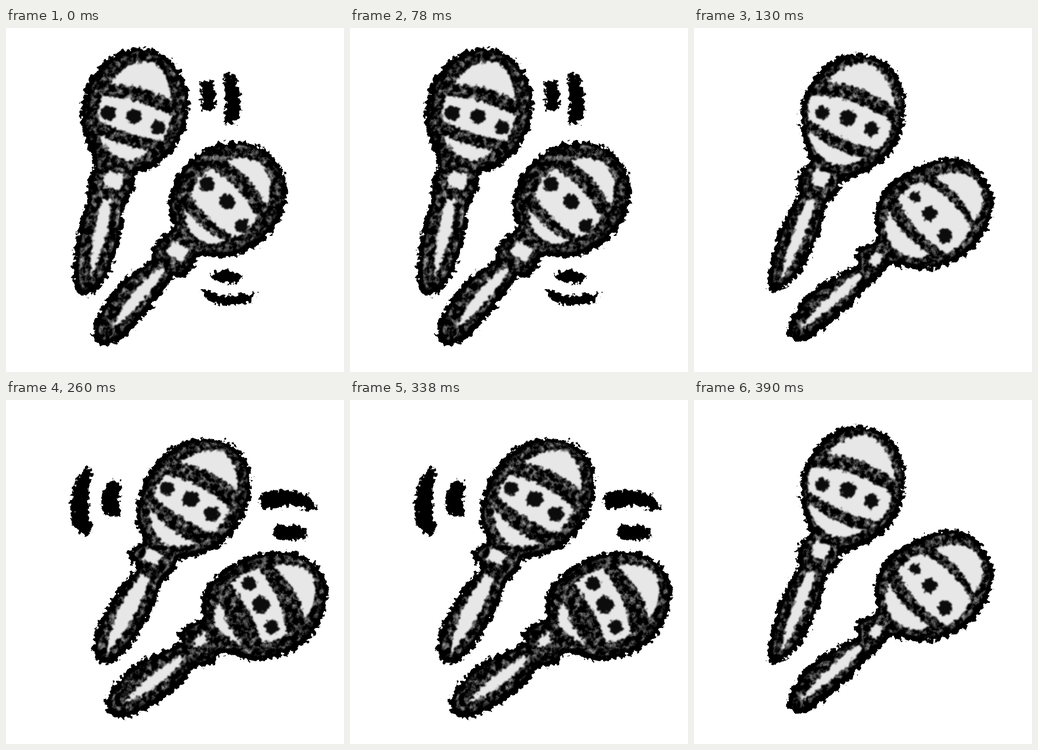
Write an HTML page that moves like this. It is 741 by 756 pixels and loops after 0.52 s.

```html
<!DOCTYPE html>
<html lang="en">
<head>
<meta charset="utf-8">
<title>Shaking maracas</title>
<style>
  html, body { margin: 0; width: 100%; height: 100%; overflow: hidden; background: #fff; }
  svg { position: absolute; left: 0; top: 0; width: 100%; height: 100%; }
  .pose { opacity: 0; will-change: opacity; }
</style>
</head>
<body>
<svg viewBox="0 0 741 756" aria-hidden="true">
  <defs>
    <!-- Ragged ink outline around a mottled charcoal body -->
    <filter id="charcoal" filterUnits="userSpaceOnUse" x="0" y="0" width="741" height="756" color-interpolation-filters="sRGB">
      <feTurbulence type="fractalNoise" baseFrequency=".1" numOctaves="3" seed="4" result="wobble"/>
      <feDisplacementMap in="SourceGraphic" in2="wobble" scale="22" xChannelSelector="R" yChannelSelector="G" result="ink"/>
      <feTurbulence type="fractalNoise" baseFrequency=".075" numOctaves="4" seed="9"/>
      <feColorMatrix values="1.5 0 0 0 -.66  1.5 0 0 0 -.66  1.5 0 0 0 -.66  0 0 0 0 1" result="grain"/>
      <feMorphology in="SourceAlpha" operator="erode" radius="9"/>
      <feOffset dx="1" dy="-2"/>
      <feGaussianBlur stdDeviation="1.5" result="core"/>
      <feComposite in="grain" in2="core" operator="in" result="body"/>
      <feMerge><feMergeNode in="ink"/><feMergeNode in="body"/></feMerge>
    </filter>
    <filter id="ink" filterUnits="userSpaceOnUse" x="0" y="0" width="741" height="756" color-interpolation-filters="sRGB">
      <feTurbulence type="fractalNoise" baseFrequency=".1" numOctaves="3" seed="2"/>
      <feDisplacementMap in="SourceGraphic" scale="22" xChannelSelector="R" yChannelSelector="G" in2="SourceGraphic" result="unused"/>
      <feTurbulence type="fractalNoise" baseFrequency=".1" numOctaves="3" seed="2" result="wobble"/>
      <feDisplacementMap in="SourceGraphic" in2="wobble" scale="22" xChannelSelector="R" yChannelSelector="G"/>
    </filter>
    <filter id="chalk" filterUnits="userSpaceOnUse" x="0" y="0" width="741" height="756" color-interpolation-filters="sRGB">
      <feTurbulence type="fractalNoise" baseFrequency=".12" numOctaves="3" seed="7" result="wobble"/>
      <feDisplacementMap in="SourceGraphic" in2="wobble" scale="15" xChannelSelector="R" yChannelSelector="G"/>
      <feGaussianBlur stdDeviation="1.7"/>
    </filter>
  </defs>
</svg>
<script>
const STEP = 130;
const ORDER = [0, 1, 2, 1];

// Smooth closed curve through "x,y x,y ..." points
function blob(points) {
  const p = points.split(' ').map(s => s.split(',').map(Number));
  const at = i => p[(i + p.length) % p.length];
  const handle = (i, sign) => [0, 1].map(k => at(i)[k] + sign * (at(i + 1)[k] - at(i - 1)[k]) / 6);
  return `M${p[0]}` + p.map((_, i) => `C${handle(i, 1)} ${handle(i + 1, -1)} ${at(i + 1)}`).join('') + 'Z';
}

function maraca(outline, patches, dots) {
  const circles = dots.map(([x, y, r]) => `<circle cx="${x}" cy="${y}" r="${r}"/>`).join('');
  return `<path d="${blob(outline)}" filter="url(#charcoal)"/>
    <g filter="url(#chalk)"><path d="${patches.join('')}" fill="#e7e7e7"/><g fill="#0c0c0c">${circles}</g></g>`;
}

const marks = (...outlines) => `<path d="${outlines.map(blob).join('')}" filter="url(#ink)"/>`;

const leftSwing =
  maraca(
    '290,44 340,55 378,92 399,140 396,205 372,262 330,303 288,320 283,350 272,376 261,390 255,440 237,510 212,562 172,589 152,572 148,520 160,440 176,378 178,345 186,322 190,290 170,240 164,190 176,130 205,85 245,55',
    ['M228 122Q258 75 308 73Q356 82 363 160Q300 124 228 122Z',
     'M211 149Q290 152 361 192L356 222 341 247Q262 236 202 201L204 165Z',
     'M204 234Q250 260 314 268Q298 290 265 292Q222 280 204 234Z',
     'M217 317L257 320 252 356 213 350Z',
     'M210 378L229 377Q234 440 185 547Q184 470 210 378Z'],
    [[224, 186, 17], [280, 194, 17], [333, 219, 16]]) +
  maraca(
    '510,249 560,262 598,298 615,340 610,395 585,445 540,485 490,504 437,503 420,505 407,530 390,547 368,548 345,580 305,630 265,675 222,697 195,688 195,650 215,605 255,555 300,520 318,505 320,480 345,455 365,432 354,400 362,355 385,310 425,272 470,253',
    ['M482 294Q530 274 565 304Q590 340 572 393Q540 325 482 294Z',
     'M449 309Q520 350 549 417L528 445 504 461Q440 425 406 367L420 332Z',
     'M391 394Q425 445 482 468Q455 480 425 467Q390 445 391 394Z',
     'M365 467L402 488 385 517 351 495Z',
     'M335 528L348 530Q325 585 234 661Q260 588 335 528Z'],
    [[441, 343, 17], [485, 381, 17], [517, 434, 15]]) +
  marks(
    '428,120 437,115 451,118 459,142 457,178 440,181 428,182 430,150',
    '479,104 489,97 504,114 515,160 511,200 495,209 479,207 481,155',
    '450,541 480,532 516,541 513,555 485,560 458,553',
    '431,576 470,587 510,588 546,580 535,600 490,610 450,603');

const centre =
  maraca(
    '360,56 412,70 445,102 462,150 458,215 440,262 400,305 345,330 324,338 318,360 300,380 288,395 275,450 245,520 212,560 180,580 164,568 168,510 185,450 212,390 230,362 225,345 235,310 252,292 240,250 232,195 245,140 275,95 315,65',
    ['M290 118Q330 77 376 77Q431 90 440 178Q380 125 290 118Z',
     'M256 149Q350 147 431 205L428 235 406 267Q325 252 250 200L250 172Z',
     'M250 225Q300 269 372 286Q345 303 308 301Q262 285 250 225Z',
     'M266 310L299 320 286 352 256 341Z',
     'M249 377L267 376Q252 455 190 556Q202 470 249 377Z'],
    [[281, 186, 15], [337, 198, 18], [389, 222, 16]]) +
  maraca(
    '560,287 600,292 635,325 656,375 650,420 625,470 580,510 530,530 480,530 435,522 415,540 390,560 375,575 350,605 305,645 260,678 230,688 205,672 212,640 240,595 290,555 340,530 358,520 352,495 375,475 398,465 396,425 405,375 440,332 490,305 525,292',
    ['M527 328Q590 302 622 342Q648 382 613 425Q585 360 527 328Z',
     'M500 337Q570 372 608 440L585 475 556 497Q482 455 447 375L472 350Z',
     'M427 402Q455 460 517 498Q490 510 458 497Q405 470 427 402Z',
     'M397 490L416 503 400 527 383 515Z',
     'M357 539L370 544Q325 605 231 664Q282 590 357 539Z'],
    [[484, 371, 13], [517, 408, 16], [550, 457, 16]]);

const rightSwing =
  maraca(
    '440,84 490,95 525,130 538,175 530,235 500,290 455,330 400,347 378,352 370,375 345,400 330,440 300,500 262,555 225,580 195,568 192,530 215,465 255,405 285,370 268,345 280,322 300,310 285,270 290,215 315,155 350,115 395,90',
    ['M379 138Q430 104 472 112Q510 132 507 198Q450 150 379 138Z',
     'M350 164Q430 180 490 238L475 270 452 292Q380 265 324 211L332 190Z',
     'M314 234Q350 290 419 315Q390 324 355 320Q316 300 314 234Z',
     'M311 325L343 340 331 363 298 350Z',
     'M298 381L312 393Q298 468 221 556Q225 478 298 381Z'],
    [[353, 194, 16], [405, 219, 18], [451, 251, 17]]) +
  maraca(
    '600,334 650,342 690,375 705,425 690,490 655,535 600,565 540,573 475,557 455,580 410,592 400,610 350,655 300,685 255,699 222,685 220,655 245,615 290,575 350,548 382,532 376,515 405,490 430,483 428,445 440,410 480,370 540,342',
    ['M587 365Q640 352 668 383Q695 428 655 482Q640 410 587 365Z',
     'M553 371Q605 430 616 515L590 528 562 534Q535 455 491 403L520 383Z',
     'M470 443Q482 495 516 537Q482 525 457 495L457 463Z',
     'M433 510L443 532 411 548 415 523Z',
     'M381 563L391 569Q345 632 254 669Q307 606 381 563Z'],
    [[533, 403, 16], [559, 450, 19], [582, 499, 16]]) +
  marks(
    '170,153 188,155 180,220 188,285 175,296 151,281 142,220 155,175',
    '228,178 250,182 248,220 251,250 240,256 213,248 212,210',
    '560,208 610,197 662,210 681,241 655,240 615,232 568,240',
    '584,285 615,272 655,285 656,305 620,307 590,302');

const poses = [leftSwing, centre, rightSwing].map(art => {
  document.body.insertAdjacentHTML('beforeend', `<svg class="pose" viewBox="0 0 741 756">${art}</svg>`);
  return document.body.lastElementChild;
});

function draw() {
  const current = ORDER[Math.floor(performance.now() / STEP) % ORDER.length];
  poses.forEach((pose, i) => { pose.style.opacity = i === current ? 1 : 0; });
  requestAnimationFrame(draw);
}
draw();
</script>
</body>
</html>
```
